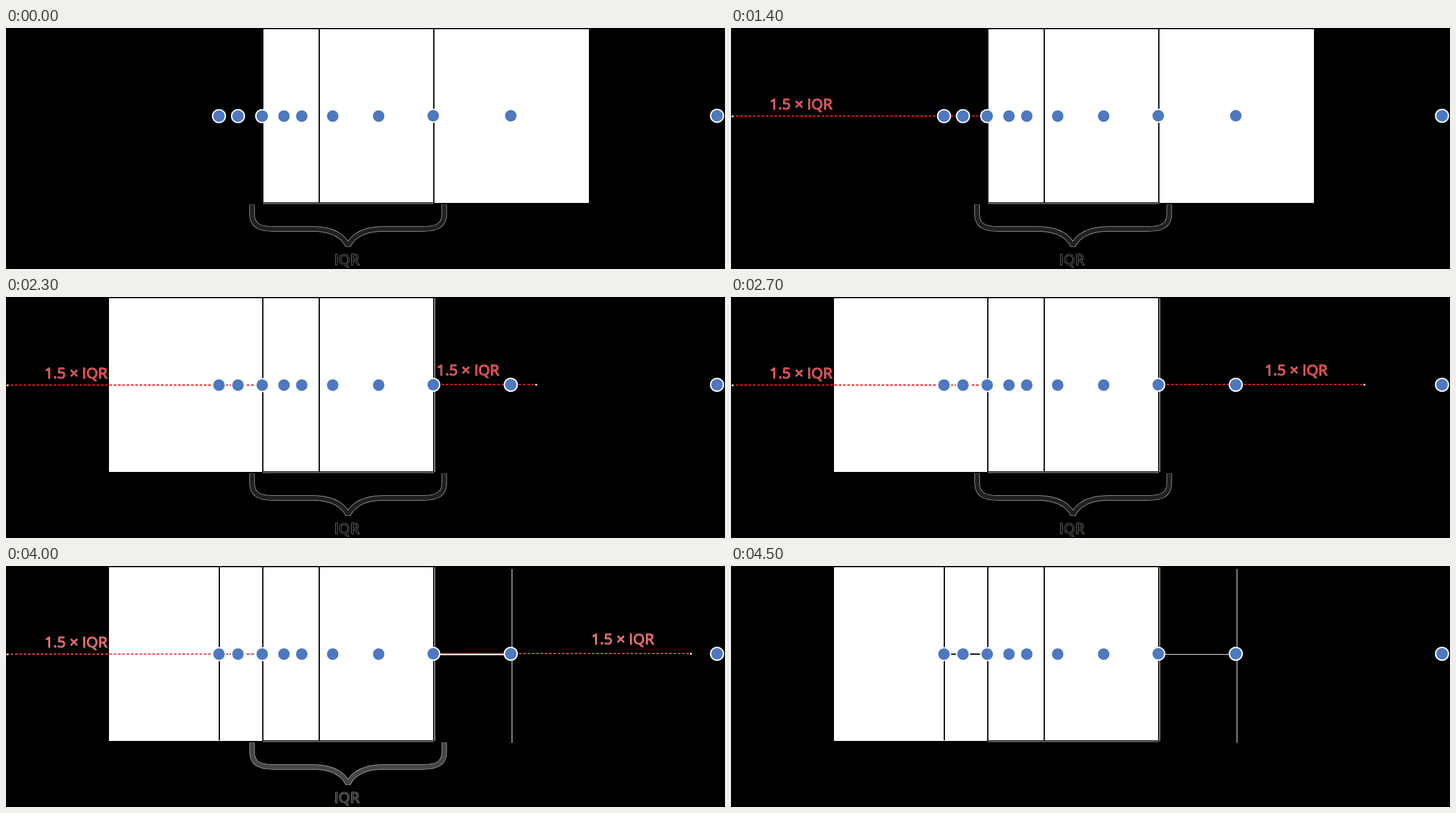
Recreate the animation shown at these times as an HTML page. Size 1173 px wide and 394 px high, loop 5500 ms.

```html
<!DOCTYPE html>
<html lang="en">
<head>
<meta charset="utf-8">
<title>Box plot whiskers</title>
<style>
html, body { margin: 0; width: 100%; height: 100%; overflow: hidden; background: #000; }
svg { display: block; }
text { font: 24.5px "Open Sans", sans-serif; paint-order: stroke; stroke-width: 1; }
.dash { stroke-width: 2; stroke-dasharray: 4.2 2.8; }
.brace { fill: none; stroke-linejoin: bevel; }
.dot { fill: #4e78bf; stroke: #fff; stroke-width: 2.2; }
</style>
</head>
<body>
<svg width="1173" height="394" viewBox="0 0 1173 394">
  <defs>
    <clipPath id="clipL"><rect width="418" height="394"/></clipPath>
    <clipPath id="clipR"><rect x="697" width="476" height="394"/></clipPath>
    <path id="curve" d="M401.5 288.500V304C401.500 322 412 328.500 436 328.500H500C530 328.500 549 338 558 356C567 338 586 328.500 616 328.500H680C704 328.500 715 322 715 304V288.500"/>
  </defs>

  <rect id="panel" y="2" height="284" fill="#fff"/>
  <rect x="418" width="281" height="287" fill="#000"/>
  <path d="M420 2H697V285H420Z" fill="#fff"/>
  <path d="M511 2V285" stroke="#000" stroke-width="2"/>
  <path d="M419 287H698" stroke="#c8c8c8"/>
  <path id="edge" d="M699.500 2V286" stroke="#fff"/>

  <g id="note">
    <use href="#curve" class="brace" stroke="#c4c4c4" stroke-width="8.600"/>
    <use href="#curve" class="brace ink" stroke-width="7.200"/>
    <text class="black" x="535.500" y="387" stroke="#d0d0d0">IQR</text>
  </g>

  <path id="backH" d="M708 144.500H813" stroke="#fff" stroke-width="3"/>
  <path id="backV" d="M824.500 5V289" stroke="#fff" stroke-width="3"/>

  <g id="reach">
    <g clip-path="url(#clipL)"><g id="left">
      <path class="dash red" d="M418 144H4"/>
      <rect x="1" y="143" width="3" height="3" fill="#ddd"/>
      <text class="red" x="63" y="133" stroke="#ffc8c8">1.5 × IQR</text>
    </g></g>
    <g clip-path="url(#clipR)"><g id="right">
      <path class="dash red" d="M697 143H1116"/>
      <rect x="1116" y="142" width="3" height="3" fill="#ddd"/>
      <text class="red" x="955" y="128" stroke="#ffc8c8">1.5 × IQR</text>
    </g></g>
  </g>

  <path id="caps" d="M348 2V285M824 5V289" stroke="#000" stroke-width="2"/>
  <g id="bars" stroke="#000">
    <path d="M348 144H418" stroke-width="2"/>
    <path d="M708 144.500H813" stroke-width="3"/>
    <path d="M708 144.500H813" stroke="#fff"/>
  </g>
  <path id="capEdge" d="M825.500 5V289" stroke="#fff"/>
  <g id="dots"></g>
</svg>
<script>
const LOOP = 5500, STEP = 100;
const $ = id => document.getElementById(id);
const clamp = v => Math.max(0, Math.min(1, v));
const show = (id, on) => $(id).setAttribute('visibility', on ? 'visible' : 'hidden');
const fade = (id, v) => $(id).setAttribute('opacity', v);
const slide = (id, x) => $(id).setAttribute('transform', `translate(${x} 0)`);

// blend a colour towards white
const pale = (rgb, k) => `rgb(${rgb.map(c => Math.round(c + (255 - c) * k))})`;

const inks = [
  ['.ink', 'stroke', [35, 31, 32]],
  ['.black', 'fill', [0, 0, 0]],
  ['.dash', 'stroke', [238, 28, 32]],
  ['text.red', 'fill', [244, 48, 52]]
].map(([sel, prop, rgb]) => ({ els: document.querySelectorAll(sel), prop, rgb }));

const points = [347.5, 378.5, 418, 453.5, 482.5, 533, 608, 697, 823.5, 1160];
$('dots').innerHTML = points
  .map((x, i) => `<circle class="dot" cx="${x}" cy="${i < 7 ? 144 : 143.5}" r="10.5"/>`)
  .join('');

function draw(time) {
  const t = Math.floor((time % LOOP) / STEP) * STEP;
  const swapped = t >= 1900;

  $('panel').setAttribute('x', swapped ? 168 : 420);
  $('panel').setAttribute('width', swapped ? 251 : 531);
  show('edge', swapped);

  slide('left', 417 * (1 - clamp((t - 400) / 1000)));
  slide('right', -421 * (1 - clamp((t - 1900) / 1000)));

  const capsOn = t >= 3400;
  show('backV', capsOn);
  show('capEdge', capsOn);
  fade('caps', capsOn ? clamp(0.25 + (t - 3400) * 0.0015) : 0);

  const out = clamp((t - 3900) / 600);
  show('backH', out > 0);
  fade('bars', out);
  show('note', out < 1);
  show('reach', out < 1);
  for (const { els, prop, rgb } of inks)
    for (const el of els) el.style[prop] = pale(rgb, out);
}

const start = performance.now();
function tick() {
  draw(performance.now() - start);
  requestAnimationFrame(tick);
}
tick();
</script>
</body>
</html>
```
